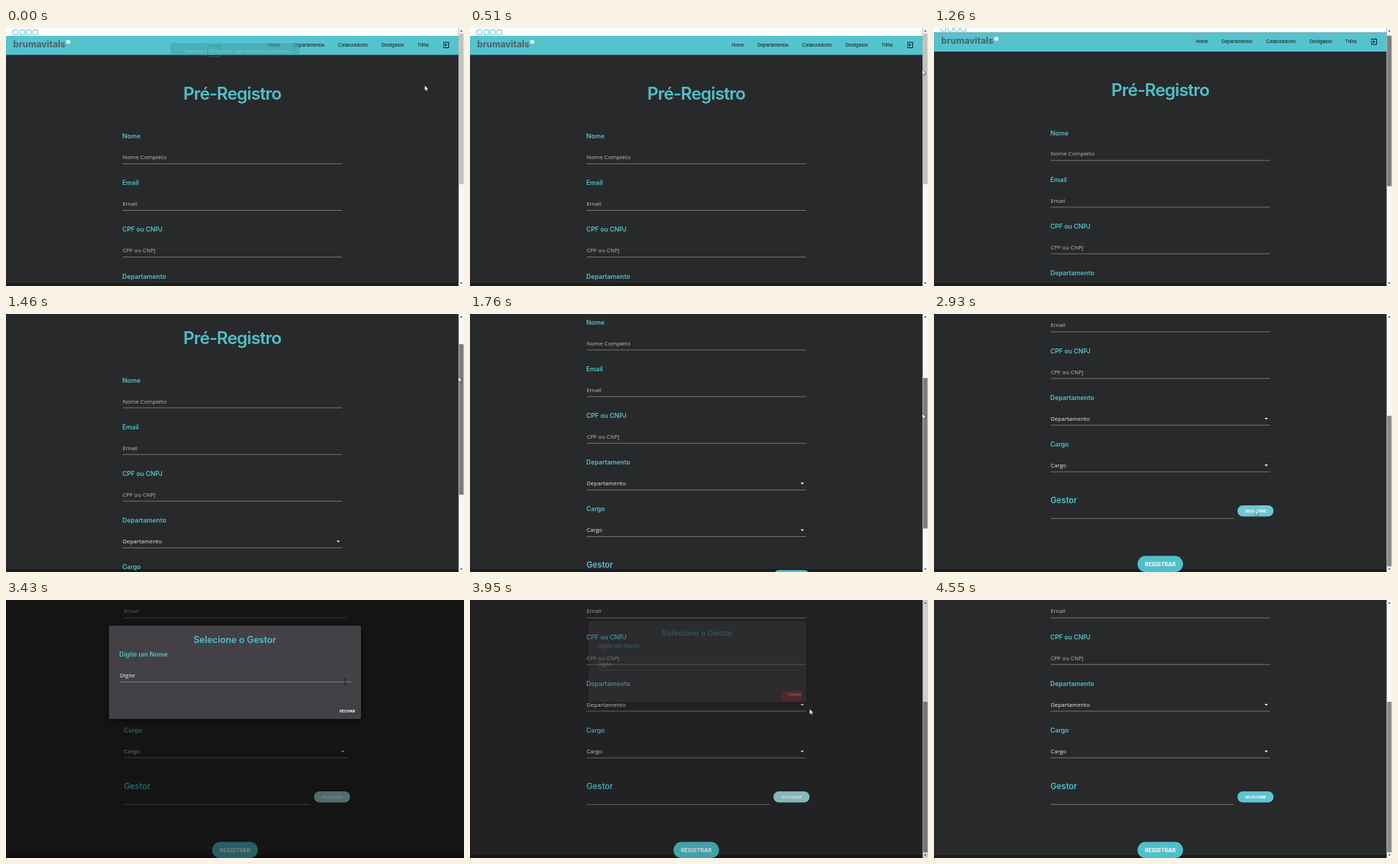
Write an HTML page that moves like this. It is 640 px wide and 360 px high and loops after 4.6 s.

```html
<!DOCTYPE html>
<html lang="pt-BR">
<head>
<meta charset="utf-8">
<title>Pré-Registro</title>
<style>
html, body { margin: 0; width: 100%; height: 100%; overflow: hidden; background: #28292b; }
svg { display: block; width: 100%; height: 100%; }
.head { font-family: Inter, "Open Sans", sans-serif; font-weight: 600; fill: #4fc0ca; }
.field { font: 8px "Open Sans", "Noto Sans", sans-serif; fill: #bdbebf; }
.select { fill: #ececec; }
.nav { font: 6.3px "Liberation Sans", Arial, sans-serif; fill: #0b1517; }
.btn { font-family: Inter, "Open Sans", sans-serif; font-weight: 700; fill: #fff; text-anchor: middle; }
.line { stroke: #98999a; stroke-width: .7; }
.mid { text-anchor: middle; }
</style>
</head>
<body>
<svg id="stage" viewBox="0 0 640 360"></svg>
<script>
const LOOP = 4600, OPEN = 3030, CLOSE = 3842, FADE = 250;
const TEAL = [79, 192, 203], PALE = [160, 217, 222];

const text = (x, y, cls, str, size) =>
  `<text x="${x}" y="${y}" class="${cls}"${size ? ` font-size="${size}"` : ''}>${str}</text>`;
const rect = (x, y, w, h, fill, rx = 0, extra = '') =>
  `<rect x="${x}" y="${y}" width="${w}" height="${h}" fill="${fill}" rx="${rx}" ${extra}/>`;
const line = (x1, x2, y) => `<path class="line" d="M${x1} ${y}H${x2}"/>`;

function header() {
  const icons = [13, 23, 32, 41].map(x =>
    rect(x - 3.4, 2.6, 6.8, 6.8, 'none', 1.3, 'stroke="#55c3ce" stroke-width="1"')).join('');
  const links = [[366, 'Home'], [402, 'Departamentos'], [464, 'Colaboradores'], [525, 'Desligados'], [575, 'Trilha']]
    .map(([x, s]) => text(x, 26, 'nav', s)).join('');
  return rect(0, 0, 632.5, 11, '#fdfefe') + icons + rect(0, 11, 632.5, 26.5, '#55c3ce') +
    `<text x="10" y="27" font-family="Inter, sans-serif" font-weight="700" font-size="12.6" fill="#4c5f66">brumavitals</text>` +
    `<circle cx="87" cy="19.5" r="2.8" fill="#fff"/>` + links +
    `<path d="M611.6 22v-2h6.8v7.6h-6.8v-2M610.5 23.8h5M613.8 21.8l2 2l-2 2" fill="none" stroke="#0b1517" stroke-width="1"/>`;
}

// l, r: column edges; c: centre of the page
function page(id, l, r, c) {
  const names = ['Nome', 'Email', 'CPF ou CNPJ', 'Departamento', 'Cargo'];
  const rows = names.map((name, i) => {
    const y = 151 + i * 65.1, pick = i > 2;
    return text(l - .5, y + 3.2, 'head', name, 8.9) +
      text(l, y + 32, pick ? 'field select' : 'field', i ? name : 'Nome Completo') + line(l, r, y + 38.4) +
      (pick ? `<path d="M${r - 7.8} ${y + 28.3}h5l-2.5 2.6z" fill="#eee"/>` : '');
  }).join('');
  return `<g id="${id}">` + header() +
    `<text x="${c}" y="100" class="head mid" font-size="24" letter-spacing="-.75">Pré-Registro</text>` + rows +
    text(l - .3, 493.2, 'head', 'Gestor', 11.5) + line(l, r - 50.5, 514.9) +
    rect(r - 45.6, 496.5, 50.5, 15.6, '#4fc0cb', 7.8, 'class="pick"') +
    text(r - 20.4, 506.2, 'btn', 'SELECIONE', 5.3) +
    rect(c - 31.8, 567.2, 63.6, 22.6, '#4fc0cb', 11.3) + text(c, 581.3, 'btn', 'REGISTRAR', 7.6) + '</g>';
}

const stage = document.getElementById('stage');
stage.innerHTML = `
<defs><filter id="blur" x="-10%" y="-20%" width="120%" height="140%"><feGaussianBlur stdDeviation="3"/></filter></defs>
${rect(0, 0, 640, 360, '#28292b')}${rect(0, 356, 640, 4, '#1d1b1c')}
${page('narrow', 163, 469.6, 316.2)}${page('wide', 165, 476, 320)}
<g id="toast">${rect(230, 21, 180, 16.5, '#419fa9', 0, 'opacity=".55"')}
  <rect x="282" y="25" width="17" height="15" fill="none" stroke="#2f7f88" stroke-width=".6"/>
  <text x="324" y="34.6" class="field mid" style="font-size:6.3px;fill:#8fdbe2" opacity=".7">Preencha o CPF apenas com caracteres numéricos...</text></g>
<g id="bar">${rect(632.5, 0, 7.5, 360, '#f7f7f7')}
  <path d="M634.5 5l1.8-2.2l1.8 2.2zM634.5 355l1.8 2.2l1.8-2.2z" fill="#555"/>
  <rect id="thumb" x="633.2" width="6.2" height="210"/></g>
<rect id="shade" width="640" height="360"/>
<g id="modal">
  ${rect(144, 40, 352, 130, '#000', 0, 'opacity=".4" filter="url(#blur)"')}
  ${rect(144, 36, 352, 130, '#434145', 1)}
  ${text(319.8, 59.5, 'head mid', 'Selecione o Gestor', 12.7)}
  ${text(158.3, 79.2, 'head', 'Digite um Nome', 8.8)}
  ${text(159, 108, 'field select', 'Digite')}${line(159, 482, 114.4)}
  ${rect(457, 148, 31.5, 16.5, '#d8322c', 1, 'id="ripple"')}
  ${text(477, 156.5, 'btn', 'FECHAR', 5.3)}
</g>
<path id="arrow" d="M0 0v7.6l1.8-1.6l1.2 2.7l1.3-.6l-1.2-2.6h2.4z" fill="#fff" stroke="#111" stroke-width=".5"/>
<path id="beam" d="M-1.5 -4h3M0 -4v8M-1.5 4h3" fill="none" stroke="#161617" stroke-width=".8"/>`;

const el = id => document.getElementById(id);
const set = (id, attr, v) => el(id).setAttribute(attr, v);
const show = (id, on) => set(id, 'visibility', on ? 'visible' : 'hidden');
const clamp = v => Math.max(0, Math.min(1, v));
const mix = (a, b, p) => a + (b - a) * p;
const smooth = p => p * p * (3 - 2 * p);

// keys: [time, ...values]
function track(keys, t, ease = p => p) {
  const i = keys.findIndex(k => k[0] > t);
  if (i < 0) return keys[keys.length - 1].slice(1);
  if (i === 0) return keys[0].slice(1);
  const a = keys[i - 1], b = keys[i], p = ease((t - a[0]) / (b[0] - a[0]));
  return a.slice(1).map((v, j) => mix(v, b[j + 1], p));
}

const SCROLL = [[1259, 0], [1260, 4.3], [1760, 139], [2140, 229.6]];
const MOUSE = [[50, 585, 80], [520, 632, 58], [1300, 632, 60], [1760, 632, 138.5], [2160, 631, 190.5],
  [2340, 631, 191], [2860, 449, 273], [3060, 449, 273], [3410, 474, 114], [3470, 474, 114],
  [3630, 474.5, 152], [4120, 474.5, 152], [4430, 642, 215]];

function draw(t) {
  const [scroll] = track(SCROLL, t);
  const open = t >= OPEN && t < CLOSE;
  const rise = 1 - (1 - clamp((t - OPEN) / FADE)) ** 3;
  const fall = 1 - (1 - clamp((t - CLOSE) / FADE)) ** 2;
  const vis = rise * (1 - fall), scale = .8 + .2 * vis;

  for (const id of ['narrow', 'wide']) set(id, 'transform', `translate(0 ${-scroll})`);
  show('narrow', !open);
  show('wide', open);
  show('bar', !open);
  set('toast', 'opacity', 1 - clamp((t - 50) / 100));
  set('thumb', 'y', 8 + scroll * .584);
  set('thumb', 'fill', t < 520 ? '#c1c1c1' : t < 2360 ? '#7b7b7b' : '#8a8a8a');

  const focus = clamp((t - 2860) / 200) * (1 - .85 * clamp((t - 4050) / 350));
  const tint = TEAL.map((v, i) => Math.round(mix(v, PALE[i], focus)));
  for (const b of document.querySelectorAll('.pick')) b.setAttribute('fill', `rgb(${tint})`);

  set('shade', 'opacity', .5 * vis);
  set('modal', 'opacity', vis);
  const cx = open ? 320 : mix(320, 317.8, clamp((t - CLOSE) / 50));
  set('modal', 'transform', `translate(${cx} ${101 - 21.6 * (1 - vis)}) scale(${scale}) translate(-320 -101)`);
  set('ripple', 'opacity', t < CLOSE - 20 ? 0 : .75);

  const [mx, my] = track(MOUSE, t, t > 1260 && t < 2160 ? undefined : smooth);
  const beam = t >= 3370 && t < 3520;
  const gone = t >= 520 && t < 1305;
  for (const id of ['arrow', 'beam']) set(id, 'transform', `translate(${mx} ${my})`);
  show('arrow', !beam && !gone && mx < 640);
  show('beam', beam);
}

const start = performance.now();
function tick() {
  draw((performance.now() - start) % LOOP);
  requestAnimationFrame(tick);
}
tick();
</script>
</body>
</html>
```
